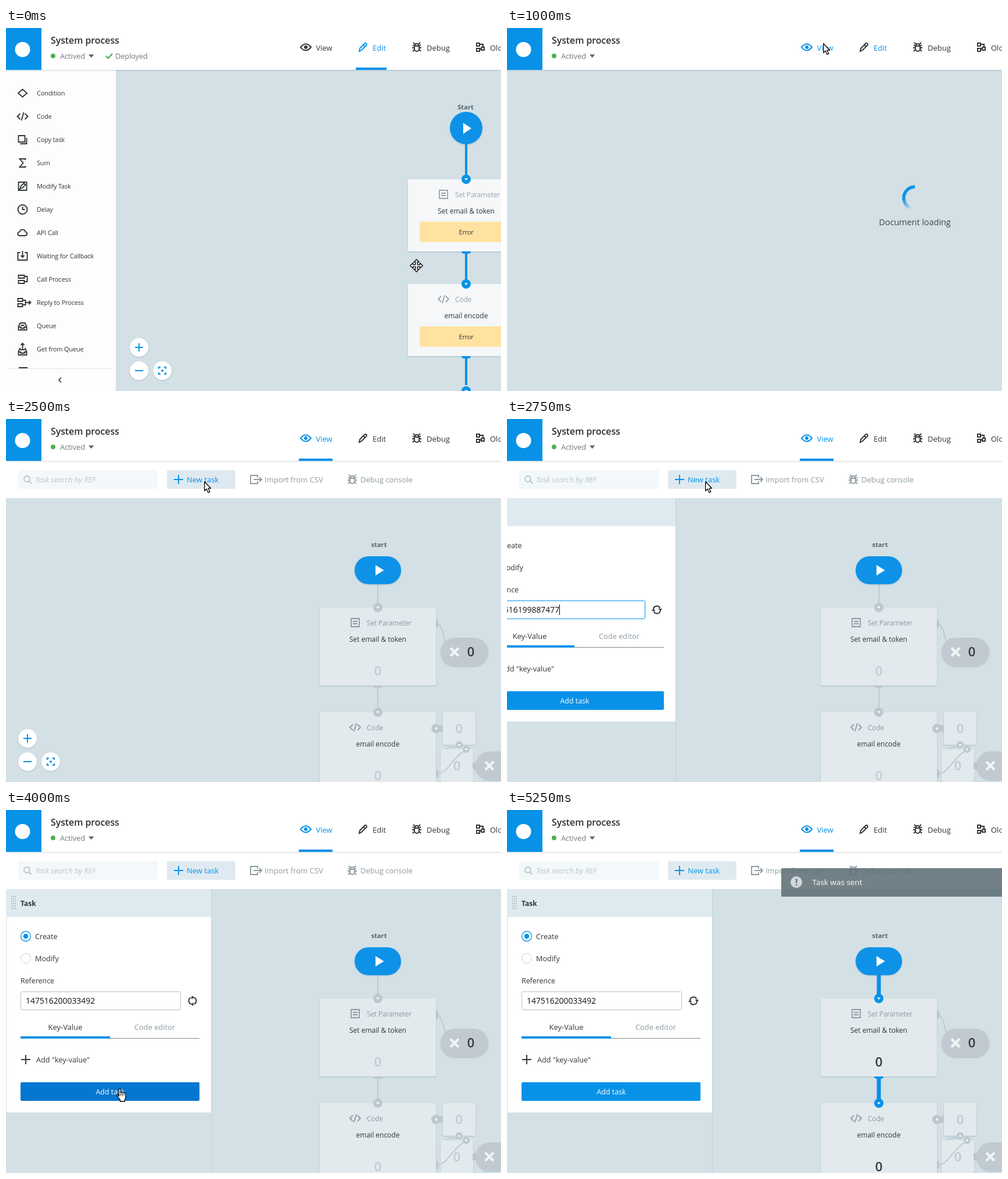
Recreate the animation shown at these times as an HTML page. Size 852x624 px, loop 6000 ms.

```html
<!DOCTYPE html>
<html lang="en">
<head>
<meta charset="utf-8">
<title>System process</title>
<style>
html, body { margin: 0; width: 100%; height: 100%; overflow: hidden; background: #d3e0e6; }
svg { display: block; width: 852px; height: 624px; font-family: "Open Sans", "Noto Sans", sans-serif; }
</style>
</head>
<body>
<svg id="stage" viewBox="0 0 852 624"></svg>
<script>
const BLUE = '#0792e8', INK = '#303538', GREY = '#8d9ba1', CANVAS = '#d3e0e6';
const LINK = '#bcc8ce', BOX = '#e2eaee', PALE = '#c1cad1';
const STEP = 250, LOOP = 6000, LAST = 21;

// Drawing helpers
const rect = (x, y, w, h, fill, r = 0, extra = '') =>
  `<rect x="${x}" y="${y}" width="${w}" height="${h}" rx="${r}" fill="${fill}" ${extra}/>`;
const dot = (x, y, r, fill, extra = '') => `<circle cx="${x}" cy="${y}" r="${r}" fill="${fill}" ${extra}/>`;
const line = (d, color, w = 2, extra = '') =>
  `<path d="${d}" fill="none" stroke="${color}" stroke-width="${w}" ${extra}/>`;
const shape = (d, fill, extra = '') => `<path d="${d}" fill="${fill}" ${extra}/>`;
const at = (x, y, body, more = '') => `<g transform="translate(${x} ${y})${more}">${body}</g>`;
const icon = (name, x, y, color = INK, w = 1.9) => at(x, y, line(ICONS[name], color, w));
const text = (s, x, y, size, fill = INK, extra = '') =>
  `<text x="${x}" y="${y}" font-size="${size}" fill="${fill}" ${extra}>${s}</text>`;
const MID = 'text-anchor="middle" ', BOLD = 'font-weight="700" ', SEMI = 'font-weight="600" ';
const SOFT = 'filter="url(#soft)"';
const track = n => `letter-spacing="${n}" `;

const ICONS = {
  condition: 'M-7.5 0L0-6.5 7.5 0 0 6.5Z',
  code: 'M-4-5L-9 0-4 5M4-5L9 0 4 5M2-7L-2 7',
  copy: 'M-7-7H4V4H-7ZM7-3V7H-4',
  sum: 'M5-5V-7H-5L1 0-5 7H5V5',
  modify: 'M-7-7H7V7H-7ZM-4 4L-3 0 2-5 5-3 0 3ZM-7 7L-3 3',
  delay: 'M0-8A8 8 0 0 1 0 8A8 8 0 0 1 0-8M0-5V0H4',
  cloud: 'M-5 5H5a3.4 3.4 0 0 0 0-6.6a5.2 5.2 0 0 0-10 0a3.3 3.3 0 0 0 0 6.6Z',
  callback: 'M-4-6H-8V7H8V-6H4M0-9V2M-3-1L0 2 3-1',
  call: 'M-7-7H3V-2H-7ZM-7 2H3V7H-7ZM3-5H8V4H3',
  reply: 'M-8-7H0V-2H-8ZM-8 2H0V7H-8ZM0-4H5V4H0M5 0H14M11-3L14 0 11 3',
  queue: 'M-7 1L-4-5H4L7 1V7H-7ZM-7 2H-3V4H3V2H7M-3-1H3',
  get: 'M-4-2L-7 4V10H7V4L4-2M-7 5H-3V7H3V5H7M0 2V-10M-3-7L0-10 3-7M-4 1H4',
  param: 'M-7-7H7V7H-7ZM-4-2H4M-4 2H4',
  bug: 'M-4-2H4V3A4 4 0 0 1-4 3ZM-3-3A3 3 0 0 1 3-3M-3-5L-6-8M3-5L6-8M-4 1H-8M4 1H8M-4-2L-7-4M4-2L7-4M-4 4L-7 7M4 4L7 7',
  pencil: 'M-6 7L-5 2 3-6Q5-8 6.5-6Q7.5-4.5 6-3L-2 5ZM1-4L4-1',
  flow: 'M-6-7H-1V-2H-6ZM-6 2H-1V7H-6ZM-1-5H5V0M2 0H7V5H2V0M2 3H-1',
  plus: 'M-8 0H8M0-8V8',
  export: 'M4-3V-7H-8V7H4V3M-3 0H11M7-4L11 0 7 4',
  search: 'M-1-6A5 5 0 0 1-1 4A5 5 0 0 1-1-6M3 3L7 7',
  cross: 'M-7-7L7 7M7-7L-7 7',
  focus: 'M-6-3V-6H-3M3-6H6V-3M6 3V6H3M-3 6H-6V3'
};

const MENU = [['condition', 'Condition'], ['code', 'Code'], ['copy', 'Copy task'], ['sum', 'Sum'],
  ['modify', 'Modify Task'], ['delay', 'Delay'], ['cloud', 'API Call'], ['callback', 'Waiting for Callback'],
  ['call', 'Call Process'], ['reply', 'Reply to Process'], ['queue', 'Queue'], ['get', 'Get from Queue']];

// Pointer: first step, kind, left, top
const POINTER = [[0, 'move', 695, 397], [1, 'arrow', 562, 40], [2, 'hand', 556, 20], [3, 'arrow', 544, 26],
  [5, 'hand', 545, 26], [8, 'arrow', 386, 90], [9, 'hand', 352, 101], [10, 'arrow', 341, 107],
  [13, 'arrow', 322, 157], [14, 'hand', 312, 322], [15, 'hand', 190, 478], [19, 'arrow', 389, 553], [20, 'none', 0, 0]];
const POINTERS = {
  arrow: 'M.7.8V16.5L4.3 13.2 7 19.5 9.8 18.3 7.1 12.2H11.6Z',
  hand: 'M4.5 14V2.5Q4.5.7 6 .7T7.6 2.5V8Q8.6 6.5 10.2 7.8Q11.8 6.8 13 8.5Q15.8 8 16 11V16Q16 18 14.5 20V23H6.5V20.5L1 13.5Q0 11 2 11Z',
  move: 'M11.5.7L16 5.5H13.2V9.8H17.5V7L22.3 11.5 17.5 16V13.2H13.2V17.5H16L11.5 22.3 7 17.5H9.8V13.2H5.5V16L.7 11.5 5.5 7V9.8H9.8V5.5H7Z',
  none: ''
};

const DEFS = `<defs><filter id="soft" x="-20%" y="-20%" width="140%" height="150%">
<feDropShadow dx="0" dy="1" stdDeviation="1.2" flood-color="#54707e" flood-opacity=".3"/></filter></defs>`;

function pointer(step) {
  const [, kind, x, y] = POINTER.filter(p => p[0] <= step).pop();
  return at(x, y, shape(POINTERS[kind], '#fff', 'stroke="#000" stroke-width="1.3" stroke-linejoin="round"') +
    (kind === 'hand' ? line('M7.6 8V13M10.3 9V13M13 10V13', '#000', 1) : ''));
}

function header(step) {
  const view = step >= 2 ? BLUE : INK;
  return rect(0, 0, 852, 72, '#fff', 0, SOFT) + rect(0, 0, 61, 72, BLUE) + dot(28.5, 37, 13, '#fff') +
    text('System process', 77, 27, 16, '#2b3033', SEMI + track(-.1)) +
    dot(81, 48, 4, '#4db052') + text('Actived', 93, 53, 13, '#757b7e', track(-.15)) +
    shape('M142 45.5H151.5L146.7 51Z', '#5d6467') +
    (step < 4 ? line('M172 48L176 52 183 44', '#4db052', 2.4) + text('Deployed', 188, 53, 13, '#757b7e', track(-.2)) : '') +
    shape('M507 33Q516 22 525 33Q516 44 507 33Z', 'none', `stroke="${view}" stroke-width="2"`) + dot(516, 33, 3, view) +
    text('View', 533.5, 39, 13, view) +
    icon('pencil', 614, 33, step < 4 ? BLUE : INK) + text('Edit', 631, 39, 13, step < 5 ? BLUE : INK) +
    icon('bug', 707, 33) + text('Debug', 724, 39, 13) + icon('flow', 816, 33, INK, 2) + text('Old', 833, 39, 13) +
    (step < 4 ? rect(602, 68, 53, 4, BLUE) : step > 4 ? rect(504, 68, 58, 4, BLUE) : '');
}

const zoom = x => [[x, 549, 'M-7 0H7M0-7V7'], [x, 589, 'M-7 0H7'], [x + 40, 589, ICONS.focus]]
  .map(([cx, cy, d]) => dot(cx, cy, 16, '#fff', SOFT) + at(cx, cy, line(d, BLUE, 2))).join('') + dot(x + 40, 589, 2, BLUE);

const port = (x, y, color, turn = 0, r = 8) =>
  dot(x, y, r, color) + at(x, y, shape('M-3-1.5H3L0 2Z', '#fff'), ` rotate(${turn})`);

const tab = (x, y, color) => shape(`M${x - 8} ${y}H${x + 8}Q${x + 8} ${y + 4} ${x + 4} ${y + 4}H${x - 4}Q${x - 8} ${y + 4} ${x - 8} ${y}Z`, color);

function editNode(y, name, label, caption) {
  return rect(692, y, 200, 124, '#f5f7f9', 2, SOFT) + port(792, y, BLUE) +
    icon(name, 753, y + 26, '#98a6ac', 1.8) + text(label, 773, y + 31, 12, '#98a6ac', track(-.2)) +
    text(caption, 792, y + 59, 12, INK, MID) + rect(712, y + 73, 160, 35, '#ffe2a0', 2) +
    text('Error', 792, y + 95, 11, INK, MID + track(-.2)) +
    line(`M792 ${y + 124}V${y + 174}`, BLUE, 4) + tab(792, y + 124, BLUE);
}

function editPage() {
  return text('Start', 791, 140, 11.2, '#56666e', MID + BOLD) + line('M792 196V254', BLUE, 4) +
    dot(792, 172, 28, BLUE, SOFT) + shape('M787 163V182L801 172.5Z', '#fff') +
    editNode(260, 'param', 'Set Parameter', 'Set email &amp; token') +
    editNode(440, 'code', 'Code', 'email encode') + port(792, 624, BLUE) + zoom(229) +
    rect(0, 72, 189, 552, '#fdfdfd') +
    MENU.map(([name, label], i) => icon(name, 28.5, 112 + 40 * i) +
      text(label, 53, 116 + 40 * i, 11, INK, track(-.18))).join('') +
    rect(22, 583, 15, 2, INK) + rect(5, 585, 176, 1, '#dfe3e5') + line('M95 601L91 605 95 609', INK, 1.7);
}

function spinner(step) {
  const turn = (step - 4) * 75, parts = 24;
  const point = a => [20 * Math.sin(a), -20 * Math.cos(a)].map(v => (v * .95).toFixed(2)).join(' ');
  let arc = '';
  for (let i = 0; i < parts; i++) {
    const a = -i * 2.75 / parts, b = a - 2.9 / parts;
    arc += line(`M${point(a)}A19 19 0 0 0 ${point(b)}`, BLUE, 5.5, `opacity="${Math.min(1, (parts - i) / 10).toFixed(2)}"`);
  }
  return at(702, 292, arc, ` rotate(${turn})`) + text('Document loading', 702, 339, 14.4, '#3d464a', MID);
}

function viewNode(y, name, label, caption, hot) {
  return rect(540, y, 200, 134, BOX, 2, SOFT) + icon(name, 601, y + 26, GREY, 1.8) +
    text(label, 621, y + 31, 12, GREY, track(-.2)) + text(caption, 640, y + 59, 12, INK, MID) +
    text('0', 640, y + 117, 22, hot ? INK : PALE, MID + SEMI);
}

const pill = (x, y, count) => rect(x, y, 82, 49, PALE, 24.5, SOFT) + icon('cross', x + 24, y + 24.5, '#f2f5f6', 4) +
  (count ? text('0', x + 52, y + 32, 22, '#33383d', MID + SEMI) : '');

const miniBox = (x, y) => rect(x, y, 56, 56, BOX, 2, SOFT) + text('0', x + 28, y + 36, 22, PALE, MID + SEMI);

function viewPage(step) {
  const hot = step >= 20, lit = step >= 21, link = lit ? BLUE : hot ? '#62addd' : LINK;
  const w = lit ? 7 : hot ? 5 : 2;
  return zoom(37) + text('start', 642, 220, 11.2, '#56666e', MID + BOLD) +
    line('M640 282V318', link, w) + rect(600, 236, 80, 48, BLUE, 24, SOFT) + shape('M636 251V269L650.5 260Z', '#fff') +
    line('M744 352Q751 358 756 384', LINK, 1.8) + rect(740, 345, 4, 14, LINK, 2) +
    viewNode(324, 'param', 'Set Parameter', 'Set email &amp; token', hot) + port(640, 324, link) +
    viewNode(504, 'code', 'Code', 'email encode', hot) +
    line('M640 460V498', link, w) + tab(640, 458, link) + port(640, 504, link) +
    pill(748, 376, true) + miniBox(752, 504) + miniBox(748, 568) +
    line('M744 610C762 606 768 582 790 570M758 567Q764 563 776 564', LINK, 1.8) +
    rect(740, 603, 4, 14, LINK, 2) + rect(746, 526, 6, 12, LINK, 2) + rect(803, 590, 6, 12, LINK, 2) +
    port(740, 532, LINK, 90) + port(780, 560, LINK, 180, 6) + port(792, 568, LINK, 0, 6) + pill(808, 571.5, false) +
    toolbar(step);
}

function toolbar(step) {
  const active = step >= 9, color = active ? BLUE : INK;
  return rect(0, 72, 852, 64, '#fff') + rect(21, 88, 240, 32, '#f3f8fa', 2) + icon('search', 37, 104, '#bac5ca') +
    text('Task search by REF', 50, 109, 13, '#bdc7cc', 'font-style="italic" ' + track(-.1)) +
    (active ? rect(277, 88, 118, 32, '#dfeaf0', 3) : '') + icon('plus', 297, 104, color) + text('New task', 311, 109, 13, color) +
    icon('export', 429, 104, GREY) + text('Import from CSV', 445, 109, 13, GREY) +
    icon('bug', 596, 104, GREY) + text('Debug console', 610, 109, 13, GREY);
}

function panel(step) {
  const focus = step < 14, pressed = step >= 15 && step <= 19;
  const spin = { 14: 30, 15: 65, 16: 95 }[step] || 0;
  let grip = '';
  for (let i = 0; i < 18; i++) grip += rect(9 + i % 3 * 3, 148 + (i / 3 | 0) * 4, 2, 2, '#b4c2c9');
  const body = rect(0, 136, 353, 500, CANVAS, 0, SOFT) + rect(0, 136, 353, 48, '#dfeaf0') + rect(1, 184, 352, 336, '#fff') +
    grip + text('Task', 25, 165, 12, INK, BOLD) +
    dot(34, 217, 8.5, '#fff', `stroke="${BLUE}" stroke-width="1.3"`) + dot(34, 217, 4.2, BLUE) + text('Create', 50, 222, 12.7) +
    dot(34, 255, 8.5, '#fff', 'stroke="#c9d0d4"') + text('Modify', 50, 260, 12.7) + text('Reference', 25, 298, 12.4) +
    rect(25.5, 312.5, 275, 31, '#fff', 2, `stroke="${focus ? BLUE : '#b9c0c4'}"`) +
    text(focus ? '147516199887477' : '147516200033492', 34, 333, 13.9, '#111') +
    (focus ? rect(153, 319, 1, 18, '#000') : '') +
    at(321, 328, line('M-6-1A6 6 0 0 1 5.4-3M6 1A6 6 0 0 1-5.4 3', INK, 2) +
      shape('M2.5-2H9L6 2ZM-2.5 2H-9L-6-2Z', INK), ` rotate(${spin})`) +
    text('Key-Value', 102, 378, 13, INK, MID) + text('Code editor', 256, 378, 12.8, GREY, MID) +
    rect(179, 392, 154, 1, '#7b868b') + rect(25, 389, 154, 4, BLUE) +
    icon('plus', 34, 429) + text('Add "key-value"', 52, 434, 12.7) +
    rect(25, 468, 308, 32, pressed ? '#0577d0' : BLUE, 2) + text('Add task', 179.5, 489, 12.4, '#fff', MID);
  return at(step === 11 ? -63 : 0, 0, body);
}

const toast = step => `<g opacity="${step === 17 ? .45 : 1}">` + rect(472, 100, 400, 49, '#5f7077', 2, 'fill-opacity=".88"') +
  dot(498, 124, 10, '#d0d7da') + rect(497, 118, 2.4, 7.5, '#5f7077') + rect(497, 127.5, 2.4, 2.4, '#5f7077') +
  text('Task was sent', 525.5, 129, 13.5, '#fff') + '</g>';

function scene(step) {
  const fading = step === 6;
  let page = step < 4 ? editPage() : '';
  if (step >= 6) page = `<g opacity="${fading ? .6 : 1}">${viewPage(step)}</g>`;
  if (step >= 4 && step <= 6) page += `<g opacity="${fading ? .6 : 1}">${spinner(step)}</g>`;
  if (step >= 11) page += panel(step);
  if (step >= 17) page += toast(step);
  return DEFS + rect(0, 0, 852, 624, CANVAS) + page + header(step) + pointer(step);
}

const stage = document.getElementById('stage');
let shown = -1;
function tick() {
  const step = Math.min(LAST, Math.floor(performance.now() % LOOP / STEP));
  if (step !== shown) stage.innerHTML = scene(shown = step);
  requestAnimationFrame(tick);
}
tick();
</script>
</body>
</html>
```
